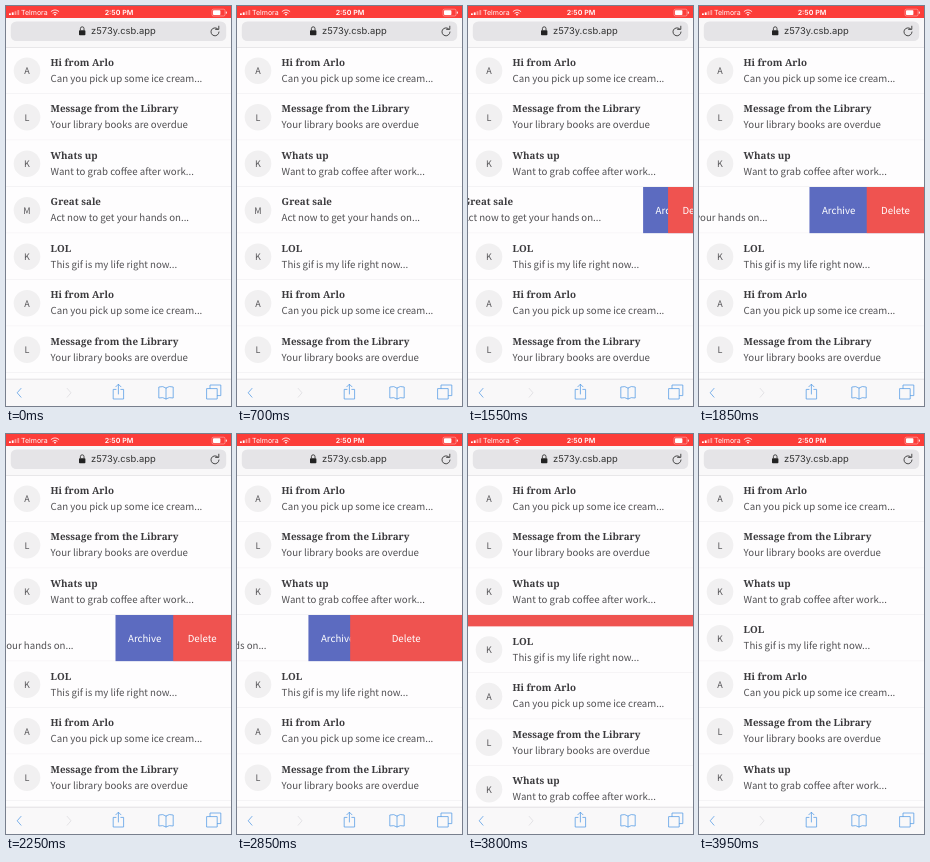
Animation of 225x400 px, one loop 4 s. Source, as an HTML page:

```html
<!DOCTYPE html>
<html lang="en">
<head>
<meta charset="utf-8">
<title>Swipe to delete</title>
<style>
  html, body { margin: 0; width: 100%; height: 100%; overflow: hidden; background: #fefdfe; }
  svg { display: block; width: 100%; height: 100%; }
  text { font-family: "Noto Sans CJK JP", "Noto Sans CJK SC", "Noto Sans", sans-serif; font-size: 9.68px; fill: #525154; text-rendering: geometricPrecision; }
  .title { font: bold 9.8px "Noto Serif", serif; fill: #3c3b3e; }
  .mid { text-anchor: middle; }
  .initial { font-size: 9px; fill: #565558; }
  .label { fill: #fff; font-weight: 500; }
  .ui { font-family: Inter, Roboto, sans-serif; }
  .line { fill: none; stroke-width: .8; stroke-linecap: round; stroke-linejoin: round; }
</style>
</head>
<body>
<svg viewBox="0 0 225 400">
  <g id="list"></g>

  <rect width="225" height="41.4" fill="#f9f8f9"/>
  <rect y="41.2" width="225" height=".6" fill="#dcdbde"/>
  <rect width="225" height="12" fill="#fc3d39"/>
  <g fill="#fff">
    <rect x="3" y="7.4" width="1.8" height="1.6"/>
    <rect x="5.8" y="6.4" width="1.8" height="2.6"/>
    <rect x="8.6" y="5.2" width="1.8" height="3.8" opacity=".45"/>
    <rect x="11.4" y="4" width="1.8" height="5" opacity=".45"/>
    <circle cx="49" cy="8.6" r=".9"/>
    <rect x="207" y="4.2" width="7.4" height="4.8" rx=".8"/>
    <rect x="219.8" y="5.6" width="1" height="2"/>
  </g>
  <path class="line" stroke="#fff" d="M45.2 5.4q3.8-3.2 7.6 0M46.9 7.1q2.1-1.8 4.2 0"/>
  <rect x="206" y="3.2" width="13" height="6.8" rx="1.4" fill="none" stroke="#fff" stroke-width=".6" opacity=".6"/>
  <text class="ui" x="15" y="9" style="font-size:7px;fill:#fff">Telmora</text>
  <text class="ui mid" x="113" y="9" style="font-size:7.1px;font-weight:600;fill:#fff">2:50 PM</text>

  <rect x="4.8" y="15.5" width="215.4" height="19.5" rx="5.5" fill="#e5e4e7"/>
  <rect x="73" y="24.2" width="6.4" height="5" rx=".8" fill="#222"/>
  <path class="line" stroke="#222" d="M74.4 24v-1.4a1.8 1.8 0 0 1 3.6 0V24"/>
  <text class="ui" x="85" y="28.4" style="font-size:9.4px;fill:#333">z573y.csb.app</text>
  <path class="line" stroke="#222" stroke-width="1.1" d="M213 26A4 4 0 1 1 211.4 22.6M212.8 20.2v3.2h-3.2"/>

  <rect y="373" width="225" height="27" fill="#f9f8f9"/>
  <rect y="372.8" width="225" height=".6" fill="#cfced1"/>
  <path class="line" stroke="#dddce0" d="M61.2 382.4l3.8 4.4-3.8 4.4"/>
  <g class="line" stroke="#5b9fe6">
    <path d="M15 382.4l-3.8 4.4 3.8 4.4"/>
    <path d="M110 383.4h-2.8v9.6h10.4v-9.6h-2.8M112.4 388v-9.6M109.8 380.8l2.6-2.6 2.6 2.6"/>
    <path d="M160 382q-3-2.4-7.2-1v11q4.2-1.2 7.2 1 3-2.2 7.2-1v-11q-4.2-1.4-7.2 1v11"/>
    <path d="M201 382.6h10.2v10.4H201zM204 382.4v-3.4h10.8v10.6h-3.4"/>
  </g>
</svg>
<script>
const MAIL = [
  ["A", "Hi from Arlo", "Can you pick up some ice cream..."],
  ["L", "Message from the Library", "Your library books are overdue"],
  ["K", "Whats up", "Want to grab coffee after work..."],
  ["M", "Great sale", "Act now to get your hands on..."],
  ["K", "LOL", "This gif is my life right now..."],
];
const W = 225, TOP = 41.4, ROW = 46.5, BUTTON = 57.6, SWIPED = 3, LOOP = 4000;
const list = document.getElementById("list");

function add(parent, tag, attrs, text = "") {
  const node = document.createElementNS("http://www.w3.org/2000/svg", tag);
  for (const key in attrs) node.setAttribute(key, attrs[key]);
  node.textContent = text;
  return parent.appendChild(node);
}

function addRow(i) {
  const [initial, title, body] = MAIL[i % MAIL.length];
  const row = add(list, "g", {});
  add(row, "rect", { width: W, height: ROW, fill: "#fefdfe" });
  const content = add(row, "g", {});
  add(content, "circle", { cx: 21, cy: 23.3, r: 13.3, fill: "#f1f0f1" });
  add(content, "text", { class: "mid initial", x: 21, y: 26.8 }, initial);
  add(content, "text", { class: "title", x: 44.6, y: 18.2 }, title);
  add(content, "text", { x: 44.6, y: 34.4 }, body);
  add(row, "rect", { y: ROW - 0.8, width: W, height: 0.8, fill: "#f2f1f3" });
  return { row, content };
}

// The swiped row lies underneath, so the rows below cover it as it collapses.
const rows = [];
for (const i of [SWIPED, 0, 1, 2, 4, 5, 6, 7, 8]) rows[i] = addRow(i);

const swiped = rows[SWIPED];
const addButton = fill => add(swiped.row, "rect", { height: ROW, fill });
const addLabel = text => add(swiped.row, "text", { class: "mid label", y: 27.2 }, text);
const archive = addButton("#5c6bc0"), archiveLabel = addLabel("Archive");
const remove = addButton("#ef5350"), removeLabel = addLabel("Delete");

const clamp = v => Math.min(1, Math.max(0, v));
const smooth = v => v * v * (3 - 2 * v);

function spring(s, decay = 7.5, freq = 5.5) {
  if (s <= 0) return 0;
  return 1 - Math.exp(-decay * s) * (Math.cos(freq * s) + decay / freq * Math.sin(freq * s));
}

// Returns the widths of both buttons together and of the archive button.
function swipe(t) {
  if (t >= 3400) return [W, 0];
  if (t > 2800) {
    const left = Math.exp(-(t - 2800) * 0.00843);
    return [W - (W - 2 * BUTTON) * left, BUTTON * left ** 0.75];
  }
  const nudge = 4 * smooth(clamp((t - 700) / 500));
  const open = nudge + (2 * BUTTON - nudge) * spring((t - 1412) / 1000);
  return [open, open / 2];
}

function place(button, width) {
  button.setAttribute("x", W - width);
  button.setAttribute("width", width);
}

function draw(now) {
  const t = now % LOOP;
  const [open, archiveWidth] = swipe(t);
  const removeWidth = open - archiveWidth;
  const collapse = 1 - (1 - clamp((t - 3650) / 300)) ** 2;

  rows.forEach(({ row }, i) => {
    const y = TOP + ROW * (i - (i > SWIPED ? collapse : 0));
    row.setAttribute("transform", `translate(0 ${y})`);
  });
  swiped.row.setAttribute("visibility", collapse < 1 ? "visible" : "hidden");
  swiped.content.setAttribute("transform", `translate(${-open} 0)`);
  place(archive, open);
  place(remove, removeWidth);
  archiveLabel.setAttribute("x", W - open + 29.2);
  removeLabel.setAttribute("x", W - removeWidth + Math.max(removeWidth, BUTTON) / 2);
  requestAnimationFrame(() => draw(performance.now() - start));
}

const start = performance.now();
draw(0);
</script>
</body>
</html>
```
